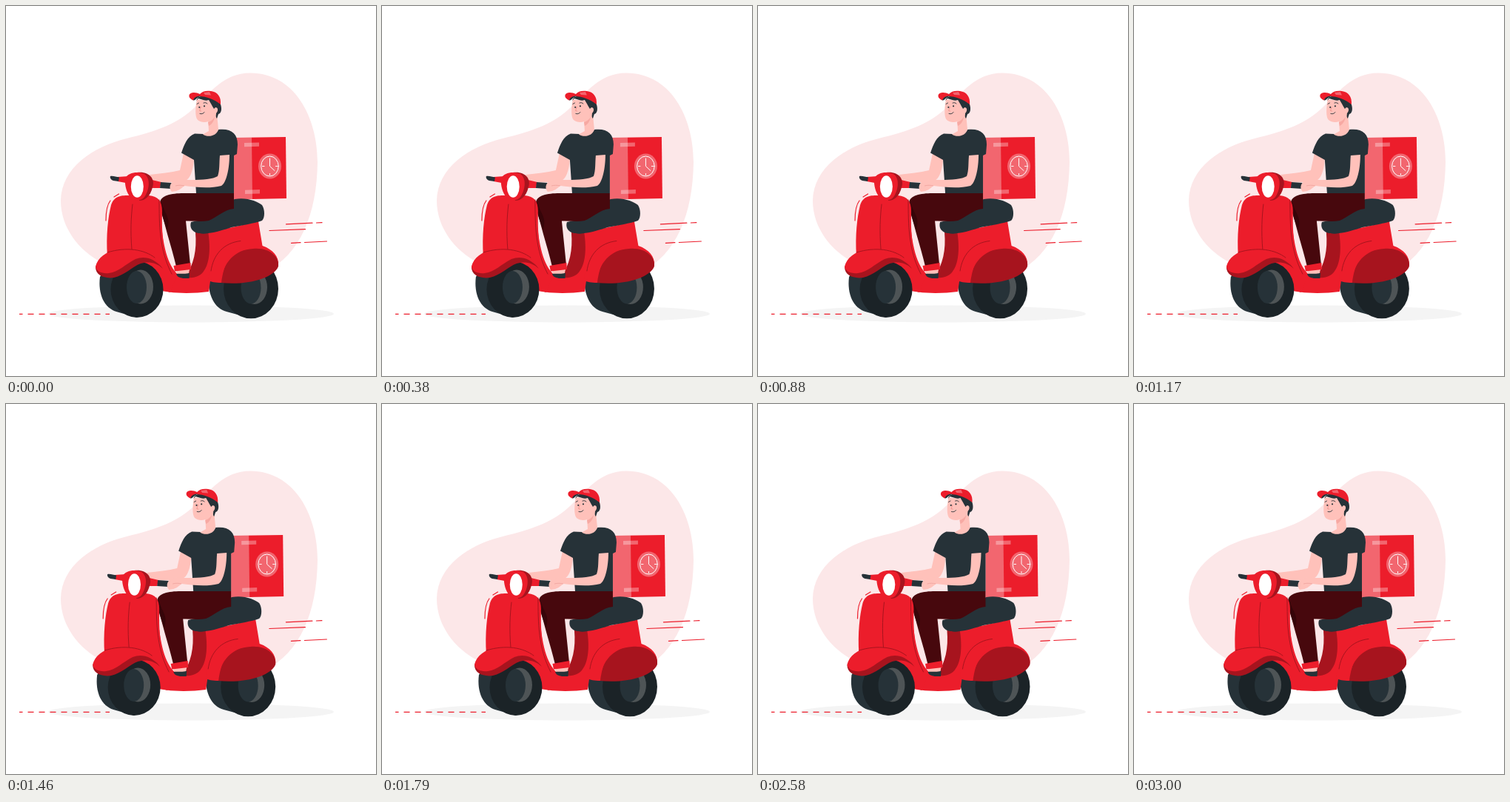
An HTML page that plays this animation: 500x500 px, repeating every 3.04 s.

```html
<!DOCTYPE html>
<html lang="en">
<head>
<meta charset="utf-8">
<title>Scooter delivery</title>
<style>
html, body { margin: 0; height: 100%; overflow: hidden; background: #fff; }
svg { display: block; width: 100%; height: 100%; }
.red { fill: #ec1d2b; }
.shade { fill: #a7141e; }
.dark { fill: #263238; }
.tire { fill: #1b2327; }
.grey { fill: #4e5456; }
.skin { fill: #ffc1ba; }
.pants { fill: #47080d; }
.line { fill: none; stroke: #ec1d2b; stroke-width: 1.2; stroke-linecap: round; }
.crease { fill: none; stroke: #a7141e; stroke-width: 1; stroke-linecap: round; }
.ink { fill: none; stroke: #263238; stroke-width: .9; stroke-linecap: round; }
.chalk { fill: none; stroke: #fff; stroke-width: 1; stroke-linecap: round; }
.tint { fill: #fff; fill-opacity: .32; }
</style>
</head>
<body>
<svg viewBox="0 0 500 500">
  <path fill="#fce7e8" d="M330 90.500C390 90.500 421 150 421 211C420 282 398 335 350 360C290 385 180 372 130 347C99 331 74 300 74 263C75 218 118 190 163 179C205 169 232 159 255 137C275 118 294 90.500 330 90.500Z"/>
  <ellipse cx="250" cy="416" rx="193" ry="11.500" fill="#f4f4f4"/>
  <path class="line" style="stroke-linecap:butt" stroke-dasharray="8 7" stroke-dashoffset="3.500" d="M18 416.300H140"/>

  <g id="wind" class="line">
    <path d="M378.500 294.800L414 293.200M419.500 293L427 292.700M356 303.500L404.500 301.700M385.500 320.300L398 319.700M403.500 319.500L433.500 318"/>
  </g>

  <g id="ride">
    <!-- parcel box -->
    <path class="red" d="M308 178L378 177L379 260L308 261.500Z"/>
    <path class="tint" d="M308 178L332 177.600L333 261L308 261.500Z"/>
    <path class="tint" d="M322 185L342 184.500V189.700L322 190.200ZM323 248.700L343 248V253.500L323 254Z"/>
    <ellipse class="tint" cx="356.500" cy="216.500" rx="15.500" ry="17"/>
    <ellipse class="chalk" cx="356.500" cy="216.500" rx="11.800" ry="13.500"/>
    <path class="chalk" d="M356.500 206V216.500L363 222.500M356.500 226.500V228.500M346.500 216.500H349M364.500 216.500H367"/>

    <!-- rear wheel and body -->
    <path class="dark" d="M274 366C272 390 282 409 298 413L331 422V350H285Z"/>
    <ellipse class="tire" cx="331" cy="382" rx="37" ry="40.300"/>
    <ellipse class="grey" cx="336" cy="380" rx="17" ry="23"/>
    <ellipse class="dark" cx="331" cy="380.500" rx="13.500" ry="22"/>
    <path class="red" d="M200 335L211 305C215 340 225 362 240 367C257 368 269 358 274 330L272 307C295 301 320 296 341 291L346.500 324C361 329 369 339 368 350C360 366 320 374 276 372L274 386C250 389 220 389 200 382Z"/>
    <path class="shade" d="M256 306L273 304C277 329 275 349 266 360C260 367 250 368 242 367C254 349 258 330 256 306Z"/>
    <path class="shade" d="M290 374C293 347 309 329 334 328C357 326 370 340 368 352C362 367 328 378 290 374Z"/>
    <path class="red" d="M274 371C273 355 278 340 288 330L318 326C302 334 294 350 291 374C283 374 277 373 274 371Z"/>
    <path class="crease" d="M277 358C280 336 294 320 317 317.500"/>
    <path class="dark" d="M250 292C262 289 272 290 283 281C293 272 300 264 309 261C325 258 340 264 346 269C350 275 350 286 346 290C335 294 320 296 305 299C295 302 285 306 270 307.500C255 309 247 302 250 292Z"/>

    <!-- rider -->
    <path class="skin" d="M240 199L254 206C253 222 249 234 242 236C228 239 212 238 199 237L194 228C209 226 223 225 235 222Z"/>
    <path class="pants" d="M208 266C209 256 223 253 240 253L308 253V274C295 275 284 286 274 290C264 292 253 290 243 290.500L249 349L230 352C224 326 212 291 208 266Z"/>
    <path d="M210 266C217 286 222 284 218 303C213 290 209 279 208 266Z" fill="#360509"/>
    <path class="skin" d="M230 355L248 353L247 363H231Z"/>
    <path class="red" d="M226.500 351L249.500 347L250 356L228 358.500Z"/>
    <path class="dark" d="M230 362C236 361 242 363 248 360.500L247.500 368H239C235 367 231 366 230 362Z"/>
    <path class="dark" d="M267 173C275 177 284 174 287 167C304 165 313 172 313 187L312 200L308 202V253H257L254 208L237 198.500C241 187 245 176 255 172.500Z"/>
    <path class="skin" d="M273 153L285 146L287 167C284 176 273 178 266 173.500L274 169Z"/>
    <path class="skin" d="M258 126C256 136 255 150 259 154C264 158 273 158 278 153L288 145L287 130Z"/>
    <path d="M273 157C277 156 280 153 282 150C281 156 278 160 274 162Z" fill="#f7a9a3"/>
    <path class="dark" d="M257 128C259 123 263 121 268 121C280 124 289 129 290 133C292 139 291 145 287 146L285 152C283 150 284 147 284 145C287 142 287 137 283 137L281 139C278 134 276 130 274 127C269 129 264 126 260 125Z"/>
    <path class="red" d="M247.500 121C248 116 257 116 262 119C265 115 271 114 277 115C286 116 291 123 290 133C281 126 271 122 261 122C257 122 255 126 253 127.500C250 126 247 124 247.500 121Z"/>
    <path d="M253 127.500C254 124 257 121.500 263 121.500L259 124C256 126 255 128 253 127.500Z" class="dark"/>
    <path class="tint" d="M267 117L275 116L277 120.500L269 120Z"/>
    <circle class="dark" cx="261.300" cy="136.800" r="1.100"/>
    <circle class="dark" cx="268" cy="135.300" r="1.100"/>
    <path class="ink" d="M258 132.500L260.500 131M267 131C269 130 271 131 272 132M262 145.500C265 146.500 267 145 268 143.500"/>
    <path fill="none" stroke="#ed8f8a" stroke-width=".8" d="M263.500 136L261.500 141.500L264 142"/>

    <!-- front shield -->
    <path class="red" d="M137 338C135 310 138 285 142 269C146 257 155 256 165 256H193C206 257 211 264 211 277C210 312 213 342 229 369L222 387L205 382Z"/>
    <path class="crease" d="M207 262C207 295 207 330 224 362M171 268C169 285 168 304 170 329"/>
    <path class="line" d="M135 290C135 278 137 268 141 263M146 258L152.500 254"/>

    <!-- front wheel and fender -->
    <path class="dark" d="M127 366C124 390 133 408 149 413L177 421V345H140Z"/>
    <ellipse class="tire" cx="177" cy="383" rx="35.500" ry="38"/>
    <ellipse class="grey" cx="182" cy="379.500" rx="17" ry="23"/>
    <ellipse class="dark" cx="176.500" cy="380" rx="13.500" ry="22"/>
    <path class="shade" d="M121 353C125 341 135 333 150 330C178 326 200 336 212 355C203 346 191 345 182 348C171 352 160 364 146 367C132 369 121 363 121 353Z"/>
    <path class="red" d="M121 352C124 340 135 332 150 329C177 326 199 334 211 353C200 341 187 337 175 342C161 349 153 359 139 361C130 362 122 359 121 352Z"/>
    <path class="crease" d="M137 333C163 325 187 329 201 340"/>

    <!-- handlebar and lamp -->
    <path class="red" d="M151 231L166 230L167 240L151 237ZM193 234L210 238L208 246L193 246Z"/>
    <path class="dark" d="M141 230C144 229 149 231 153 231.500L152 237L145 236C142 235 140 232 141 230ZM209 238L224 239L223 247L208 246Z"/>
    <path class="shade" d="M177 225C194 223 202 234 198 245C195 257 188 263 180 263Z"/>
    <path class="red" d="M161 233C165 225 178 223 187 227C195 232 194 246 189 255C186 261 182 263 175 262C164 260 160 243 161 233Z"/>
    <ellipse cx="177.300" cy="244" rx="8.500" ry="14.700" fill="#fff"/>

    <!-- near arm -->
    <path class="skin" d="M289 202L302 201C302 219 298 239 291 243C276 247 256 245 241 243C236 247 234 250 224 251C220 247 221 240 226 237C234 233 241 235 250 235C266 235 280 234 286 230C289 222 288 212 289 202Z"/>
    <path fill="none" stroke="#ed9e98" stroke-width=".7" d="M229 243C233 242 237 242 241 243"/>
  </g>
</svg>
<script>
const LOOP = 3040, LAG = 20, SPAN = 3000;
const shakes = [0, -1, 2, -4, 4, -4, 4, -4, 2, -1, 0];
const ride = document.getElementById('ride');
const wind = document.getElementById('wind');

const bezier = (a, b, u) => 3 * a * u * (1 - u) ** 2 + 3 * b * u * u * (1 - u) + u ** 3;

// cubic-bezier(.25, .1, .25, 1)
function ease(x) {
  let lo = 0, hi = 1;
  for (let i = 0; i < 20; i++) {
    const mid = (lo + hi) / 2;
    if (bezier(.25, .25, mid) < x) lo = mid; else hi = mid;
  }
  return bezier(.1, 1, lo);
}

function shake(t, period) {
  const p = t % period / period * 10, i = Math.floor(p);
  return shakes[i] + (shakes[i + 1] - shakes[i]) * ease(p - i);
}

function draw() {
  const t = Math.min(SPAN, Math.max(0, performance.now() % LOOP - LAG));
  ride.setAttribute('transform', `translate(${shake(t, SPAN)} 0)`);
  wind.setAttribute('transform', `translate(${shake(t, SPAN / 2)} 0)`);
  requestAnimationFrame(draw);
}
draw();
</script>
</body>
</html>
```
